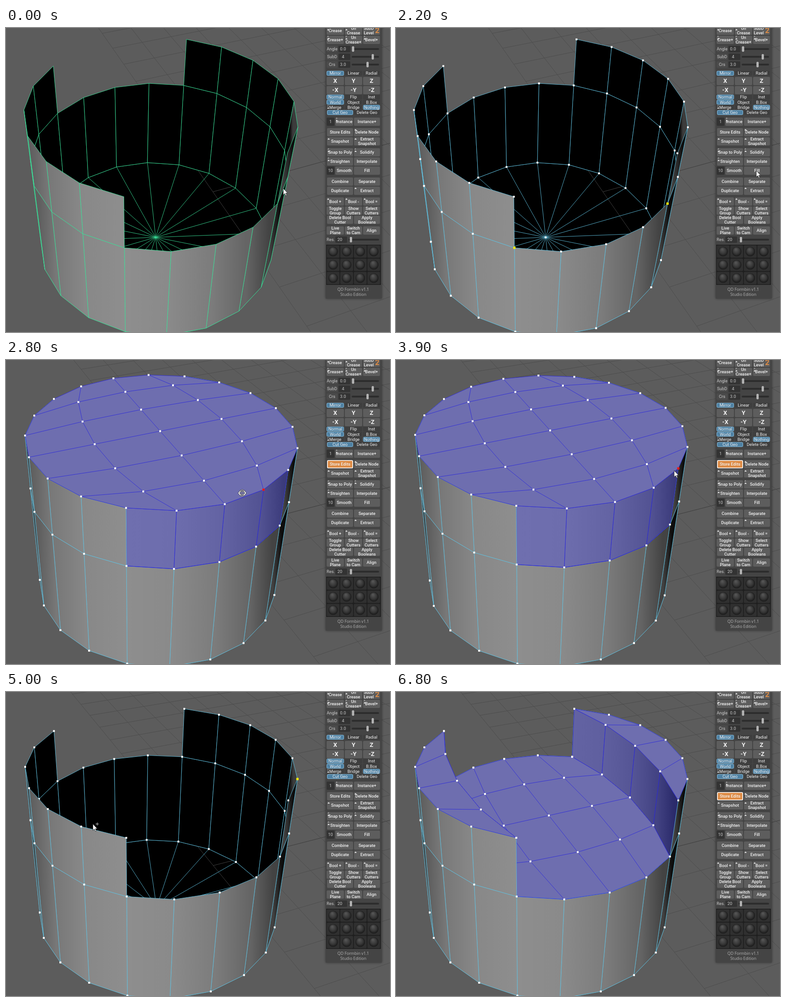
Write an HTML page with a canvas that moves like this. It is 842 px wide and 665 px high and loops after 7100 ms.

```html
<!DOCTYPE html>
<html lang="en">
<head>
<meta charset="utf-8">
<title>Fill tool</title>
<style>
html, body { margin: 0; width: 100%; height: 100%; overflow: hidden; background: #5c5c5c; }
canvas { display: block; width: 842px; height: 665px; }
</style>
</head>
<body>
<canvas id="stage" width="842" height="665"></canvas>
<script>
const ctx = document.getElementById('stage').getContext('2d');
const LOOP = 7100, STEP = 100, SIDES = 20, TOP = 0, MID = 1 / 3, BOTTOM = 1;
const GREEN = '#3be69c', CYAN = '#62c6e6', BLUE = '#2b29dc', PURPLE = '#6e6eaf';
const YELLOW = '#ffee00', RED = '#f01818';

const mix = (a, b, k) => a + (b - a) * k;
const mixPoint = (a, b, k) => a.map((v, i) => mix(v, b[i], k));
const range = (a, b) => Array.from({ length: Math.abs(b - a) + 1 }, (_, i) => a + i * Math.sign(b - a));
const progress = (t, from, to) => Math.min(1, Math.max(0, (t - from) / (to - from)));
const easeOut = (k, power) => 1 - (1 - k) ** power;

// ---- Model: a 20-sided unit cylinder, depth 0 at the top and 1 at the bottom ----

function vertex(i, z) {
  const a = i * 2 * Math.PI / SIDES;
  return [Math.cos(a), Math.sin(a), z];
}
const arc = (a, b, z) => range(a, b).map(i => vertex(i, z));

// Inner border of a ledge: a flattened arc in four segments.
const rim = (a, b, z) => range(0, 4).map(n => {
  const k = n / 4;
  return mixPoint(mixPoint(vertex(a, z), vertex(b, z), k), vertex(mix(a, b, k), z), .33);
});

// Grid of quads spanned between four borders.
function patch(top, bottom, left, right) {
  const m = top.length - 1, n = left.length - 1;
  return left.map((l, r) => top.map((p, c) => p.map((_, a) => {
    const u = c / m, v = r / n;
    return mix(p[a], bottom[c][a], v) + mix(l[a], right[r][a], u)
      - mix(mix(top[0][a], top[m][a], u), mix(bottom[0][a], bottom[m][a], u), v);
  })));
}

const capGrid = patch(arc(16, 20, TOP), arc(10, 6, TOP), arc(16, 10, TOP), arc(0, 6, TOP));
const floorGrid = patch(arc(16, 20, MID), arc(10, 6, MID), rim(16, 10, MID), rim(0, 6, MID));

// ---- Camera: fitted to where eight corners of the model appear ----

const corners = [...[0, 5, 10, 15].map(i => vertex(i, TOP)), ...[0, 5, 10, 13].map(i => vertex(i, BOTTOM))];
const steepView = [[396, 25], [640, 217], [258, 369], [60, 127], [379, 299], [581, 508], [262, 664], [85, 528]];
const lowView = [[391, 37], [639, 190], [264, 319], [62, 121], [378, 327], [589, 515], [266, 664], [83, 538]];

// Least squares; each row holds the coefficients and then the right-hand side.
function solve(rows) {
  const n = rows[0].length - 1;
  const m = range(0, n - 1).map(i => range(0, n).map(j => rows.reduce((s, r) => s + r[i] * r[j], 0)));
  for (let i = 0; i < n; i++) {
    const pivot = m[i][i];
    m[i] = m[i].map(v => v / pivot);
    for (let r = 0; r < n; r++) {
      const f = m[r][i];
      if (r !== i) m[r] = m[r].map((v, j) => v - f * m[i][j]);
    }
  }
  return m.map(row => row[n]);
}

function makeCamera(k) {
  const unit = 400;
  const rows = corners.flatMap((p, i) => {
    const [u, v] = mixPoint(steepView[i], lowView[i], k).map(s => s / unit);
    return [[...p, 1, 0, 0, 0, 0, ...p.map(s => -s * u), u], [0, 0, 0, 0, ...p, 1, ...p.map(s => -s * v), v]];
  });
  const c = solve(rows);
  const dot = (p, at) => p[0] * c[at] + p[1] * c[at + 1] + p[2] * c[at + 2];
  return p => {
    const w = (dot(p, 8) + 1) / unit;
    return [(dot(p, 0) + c[3]) / w, (dot(p, 4) + c[7]) / w];
  };
}

// ---- Drawing helpers ----

function trace(points) {
  ctx.beginPath();
  points.forEach(p => ctx.lineTo(p[0], p[1]));
}
function line(points, color, width = .85) {
  trace(points);
  ctx.strokeStyle = color;
  ctx.lineWidth = width;
  ctx.stroke();
}
function face(points, fill, edge) {
  trace(points);
  ctx.closePath();
  ctx.fillStyle = fill;
  ctx.fill();
  if (edge) { ctx.strokeStyle = edge; ctx.lineWidth = .85; ctx.stroke(); }
}
function shadedFace([a, b, c, d], from, to, edge, tinted) {
  const g = ctx.createLinearGradient((a[0] + d[0]) / 2, 0, (b[0] + c[0]) / 2, 0);
  [from, to].forEach((s, i) => {
    const low = tinted ? s * .7 + 12 : s, high = tinted ? s * .7 + 76 : s;
    g.addColorStop(i, `rgb(${low},${low},${high})`);
  });
  face([a, b, c, d], g, edge);
}
function dots(points, color = '#fff', size = 4) {
  ctx.fillStyle = color;
  points.forEach(p => ctx.fillRect(p[0] - size / 2, p[1] - size / 2, size, size));
}
function lattice(grid) {
  const inner = grid.slice(1, -1);
  inner.forEach(row => line(row, BLUE));
  for (let c = 1; c < grid[0].length - 1; c++) line(grid.map(row => row[c]), BLUE);
  dots(inner.flatMap(row => row.slice(1, -1)));
}

// ---- Scene ----

function makeGround(project) {
  const turn = vertex(3, 0), cell = .4, x0 = .727, y0 = .34;
  const at = (x, y) => project([turn[0] * x + turn[1] * y, turn[1] * x - turn[0] * y, BOTTOM]);
  const along = x => [at(x, -2.4), at(x, 7)], across = y => [at(x0, y), at(8, y)];
  return {
    main: [along(x0), across(y0)],
    draw() {
      for (let n = -6; n <= 15; n++) line(across(y0 + n * cell), n ? '#4d4d4d' : '#3c3c3c', 1);
      for (let n = 0; n <= 18; n++) line(along(x0 + n * cell), '#4d4d4d', 1);
    }
  };
}

// Light falls from slightly left of the viewer.
const shade = i => 142 * Math.max(0, Math.cos((i - 9.9) * Math.PI / 10)) ** .7;
const notch = i => i >= 16 || i >= 6 && i < 10;
const isFront = i => i >= 5 && i < 14;

function drawMesh(t, filled, project, ground) {
  const at = (i, z) => project(vertex(i, z));
  const ring = (a, b, z) => arc(a, b, z).map(project);
  const quad = (i, z1, z2) => [at(i, z1), at(i + 1, z1), at(i + 1, z2), at(i, z2)];
  const upper = i => quad(i, TOP, MID), lower = i => quad(i, MID, BOTTOM);
  const vertexMode = t >= 500, edge = vertexMode ? CYAN : GREEN;
  const sides = range(0, SIDES - 1), base = ring(0, SIDES - 1, BOTTOM), center = project([0, 0, BOTTOM]);

  face(base, '#000', edge);
  ctx.save();
  trace(base);
  ctx.clip();
  ground.main.forEach(l => line(l, '#3f3f3f', 1));
  ctx.restore();
  base.forEach(p => line([center, p], edge));
  for (const i of sides.filter(i => !isFront(i))) {
    face(lower(i), '#000', edge);
    if (i === 4) shadedFace(upper(i), 0, 60, edge);
    else if (!notch(i)) face(upper(i), '#000', edge);
  }
  if (vertexMode) dots([...base, ...ring(0, SIDES - 1, MID), center]);
  if (filled === 2) drawRecess(project);

  for (const i of sides.filter(isFront)) {
    shadedFace(lower(i), shade(i), shade(i + 1), edge);
    if (!notch(i)) shadedFace(upper(i), shade(i), shade(i + 1), edge);
    else if (filled === 1) shadedFace(upper(i), shade(i), shade(i + 1), BLUE, true);
  }
  if (filled) line(ring(6, 10, MID), BLUE);
  if (filled === 1) {
    face(ring(0, SIDES - 1, TOP), PURPLE, BLUE);
    lattice(capGrid.map(row => row.map(project)));
  }
  if (filled === 2) drawLedges(project);
  if (vertexMode) {
    dots(filled === 1 ? ring(0, SIDES - 1, TOP) : [...ring(0, 6, TOP), ...ring(10, 16, TOP)]);
    dots([...ring(5, 14, MID), ...ring(5, 14, BOTTOM)]);
  }
  for (const [from, to, color, i, z] of marks)
    if (t >= from && t < to) dots([at(i, z)], color, 5);
}

// Lower floor and the walls that rise from it.
function drawRecess(project) {
  const grid = floorGrid.map(row => row.map(project)), end = grid.length - 1;
  const column = c => grid.map(row => row[c]);
  face([...grid[0], ...column(end), ...grid[end].slice().reverse(), ...column(0).reverse()], PURPLE, BLUE);
  lattice(grid);
  const wall = (a, b, light) => {
    const high = rim(a, b, TOP).map(project), low = rim(a, b, MID).map(project);
    for (let i = 0; i < 4; i++)
      shadedFace([high[i], high[i + 1], low[i + 1], low[i]], light(i / 4), light((i + 1) / 4), BLUE, true);
  };
  wall(16, 10, () => 0);
  wall(0, 6, k => 124 - 80 * k * k);
  dots([...column(end), ...grid[0].slice(1)]);
}

function drawLedges(project) {
  for (const [a, b] of [[16, 10], [0, 6]]) {
    const outer = arc(a, b, TOP).map(project), inner = rim(a, b, TOP).map(project);
    face([...outer, ...inner.slice().reverse()], PURPLE, BLUE);
    for (let n = 1; n < 4; n++) line([inner[n], outer[n + 1]], BLUE);
    dots(inner);
  }
}

// ---- Tool panel ----

// First centre line, pitch and rows. Marks: * active, ^ arrow, ~ arrow with s, # number field
const buttonGroups = [
  [6, 20, '~Crease|~Un/Crease|SubD/Level', '~Crease+|~Un/Crease+|~Bevel+'],
  [99, 11, '*Mirror|Linear|Radial'],
  [116, 20, 'X|Y|Z', '-X|-Y|-Z'],
  [151, 11.3, '*Normal|Flip|Inst', '*World|Object|B.Box', '~Merge|Bridge|*Nothing', '*Cut Geo|Delete Geo'],
  [205, 20, '#1|~Instance|Instance+'],
  [228, 20, 'Store Edits|^Delete Node', '^Snapshot|^Extract/Snapshot'],
  [272, 20, '~Snap to Poly|~Solidify', '~Straighten|Interpolate', '#10|Smooth|Fill'],
  [336, 20, 'Combine|Separate', 'Duplicate|^Extract'],
  [379.5, 20, '^Bool +|^Bool -|^Bool =', 'Toggle/Group|Show/Cutters|Select/Cutters', 'Delete Bool/Cutter|Apply/Booleans'],
  [443, 20, 'Live/Plane|Switch/to Cam|Align']];
const sliders = [[46, 'Angle', '0.0', .05], [63, 'SubD', '4', .77], [80, 'Crs', '3.0', .58], [463, 'Res.', '20', .08]];

function box(x, y, w, h, fill, border, width = 1) {
  const inset = border ? width / 2 : 0;
  ctx.beginPath();
  ctx.roundRect(x + inset, y + inset, w - 2 * inset, h - 2 * inset, 2);
  ctx.fillStyle = fill;
  ctx.fill();
  if (border) { ctx.strokeStyle = border; ctx.lineWidth = width; ctx.stroke(); }
}
function text(str, x, y, size = 9.3, color = '#f2f2f2', weight = 500, family = 'Roboto') {
  ctx.font = `${weight} ${size}px ${family}, sans-serif`;
  ctx.fillStyle = color;
  ctx.fillText(str, x, y + .5);
}

function button(label, x, y, w, h, stored) {
  const kind = '*^~#'.includes(label[0]) ? label[0] : '';
  const name = label.slice(kind.length), small = h < 12, lines = name.split('/');
  const orange = stored && name === 'Store Edits', level = name.startsWith('SubD');
  const fill = orange ? '#dd8b45' : kind === '*' ? '#4f81a3' : kind === '#' ? '#333' : small ? '#3e3e3e' : '#5d5d5d';
  box(x, y - h / 2, w, h, fill, orange ? '#fff' : kind === '*' ? '#86bfe2' : '', orange ? 1.6 : 1);
  const size = /^-?[XYZ]$/.test(name) ? 13 : 9.3;
  lines.forEach((str, i) => text(str, x + w / 2 - (level ? 6 : 0), y + (i - (lines.length - 1) / 2) * 10.4,
    size, kind === '#' ? '#ccc' : '#f2f2f2', small || kind === '#' ? 400 : size > 10 ? 700 : 500));
  if (level) text('2', x + w - 6, y, 16, '#dd8b45', 700);
  if (kind === '^' || kind === '~') {
    const top = y - h / 2 + (kind === '~' ? 6 : 3);
    face([[x + 1, top + 2], [x + 3.5, top - 1], [x + 6, top + 2]], '#eee');
    if (kind === '~') text('s', x + 3, top - 5, 6, '#ccc', 400);
  }
}

function drawPanel(stored) {
  ctx.save();
  ctx.shadowColor = 'rgba(0,0,0,.45)';
  ctx.shadowBlur = 5;
  ctx.fillStyle = '#444';
  ctx.fillRect(701, -8, 123, 600);
  ctx.restore();
  ctx.textAlign = 'center';
  ctx.textBaseline = 'middle';
  for (const [first, pitch, ...rows] of buttonGroups) rows.forEach((labels, n) => {
    const cells = labels.split('|');
    const edges = labels[0] === '#' ? [703, 722, 763, 822] : cells.length === 3 ? [703, 743, 783, 822] : [704, 763, 822];
    const h = pitch < 12 ? 10.5 : 18;
    cells.forEach((label, i) => button(label, edges[i], first + n * pitch, edges[i + 1] - edges[i] - 2, h, stored));
  });
  for (const [y, label, value, amount] of sliders) {
    const wide = y > 100, field = wide ? 722 : 729, start = wide ? 751 : 758;
    if (!wide) box(703, y - 7, 24, 14, '#4b4b4b');
    text(label, wide ? 712 : 715, y, 9.3, '#ccc', 400);
    box(field, y - 7, 26, 14, '#333');
    text(value, field + 10, y, 9.3, '#ccc', 400);
    box(start, y - 2, 818 - start, 4, '#2d2d2d');
    box(start + amount * (818 - start) - 2.5, y - 6, 5, 12, '#b5b5b5');
  }
  ctx.fillStyle = '#1f1f1f';
  ctx.fillRect(702, 474, 120, 88);
  for (let i = 0; i < 12; i++) {
    const x = 717.3 + i % 4 * 29.7, y = 489 + Math.floor(i / 4) * 29;
    box(x - 14, y - 13.5, 28, 27, '#303030');
    const g = ctx.createRadialGradient(x - 2, y - 5, 1, x, y, 11);
    g.addColorStop(0, '#555');
    g.addColorStop(.6, '#363636');
    g.addColorStop(1, '#161616');
    ctx.beginPath();
    ctx.arc(x, y, 10.5, 0, 7);
    ctx.fillStyle = g;
    ctx.fill();
  }
  text('QD Formbin v1.1', 761.5, 572, 8.8, '#b5b5b5', 400, 'Open Sans');
  text('Studio Edition', 761.5, 583, 8.8, '#b5b5b5', 400, 'Open Sans');
}

// ---- Story: picks and pointer moves ----

// start, end, colour, vertex
const marks = [
  [900, 2400, YELLOW, 6, MID], [1700, 2400, YELLOW, 10, MID],
  [2600, 3700, RED, 7, TOP], [3700, 4100, RED, 6, TOP],
  [4400, 6100, YELLOW, 5, TOP], [5200, 6100, YELLOW, 11, TOP]];

const steep = makeCamera(0), low = makeCamera(1), fillButton = [790, 312];
const moves = [
  [300, 800, steep(vertex(6, MID))], [1000, 1600, steep(vertex(10, MID))], [1700, 2200, fillButton],
  [2400, 2600, [518, 291]], [3500, 4000, low(vertex(6, TOP))], [4100, 4300, low(vertex(5, TOP))],
  [4400, 5100, low(vertex(11, TOP))], [5200, 5800, fillButton], [6400, 6800, [290, 690]]];
const pointerAt = t => moves.reduce((p, [from, to, goal]) =>
  mixPoint(p, goal, easeOut(progress(t, from, to), 1.5)), [608, 351]);

function drawPointer(t) {
  ctx.save();
  ctx.translate(...pointerAt(t));
  if (t >= 2600 && t < 3500) {
    for (const [color, width] of [['#222', 2.6], ['#fff', 1.2]]) {
      ctx.beginPath();
      ctx.arc(0, 0, 6.5, 0, 7);
      ctx.moveTo(8, 0);
      ctx.ellipse(0, 0, 8, 3, 0, 0, 7);
      ctx.strokeStyle = color;
      ctx.lineWidth = width;
      ctx.stroke();
    }
  } else {
    face([[0, 0], [0, 14], [3.2, 11], [5.5, 16], [7.6, 15], [5.4, 10.3], [9.6, 10.3]], '#fff', '#222');
    if (t >= 4500 && t < 5200) {
      line([[6, 0], [13, 0]], '#ccc', 1);
      line([[9.5, -3.5], [9.5, 3.5]], '#ccc', 1);
    }
  }
  ctx.restore();
}

function render(now) {
  const t = Math.floor(now % LOOP / STEP) * STEP;
  const project = makeCamera(easeOut(progress(t, 2500, 3000), 2.6));
  const filled = t >= 6100 ? 2 : t >= 2400 && t < 4100 ? 1 : 0;
  const ground = makeGround(project);
  ctx.fillStyle = '#5c5c5c';
  ctx.fillRect(0, 0, 842, 665);
  ctx.lineJoin = 'round';
  ground.draw();
  drawMesh(t, filled, project, ground);
  drawPanel(filled > 0);
  drawPointer(t);
}

const start = performance.now();
function loop() {
  render(performance.now() - start);
  requestAnimationFrame(loop);
}
loop();
</script>
</body>
</html>
```
